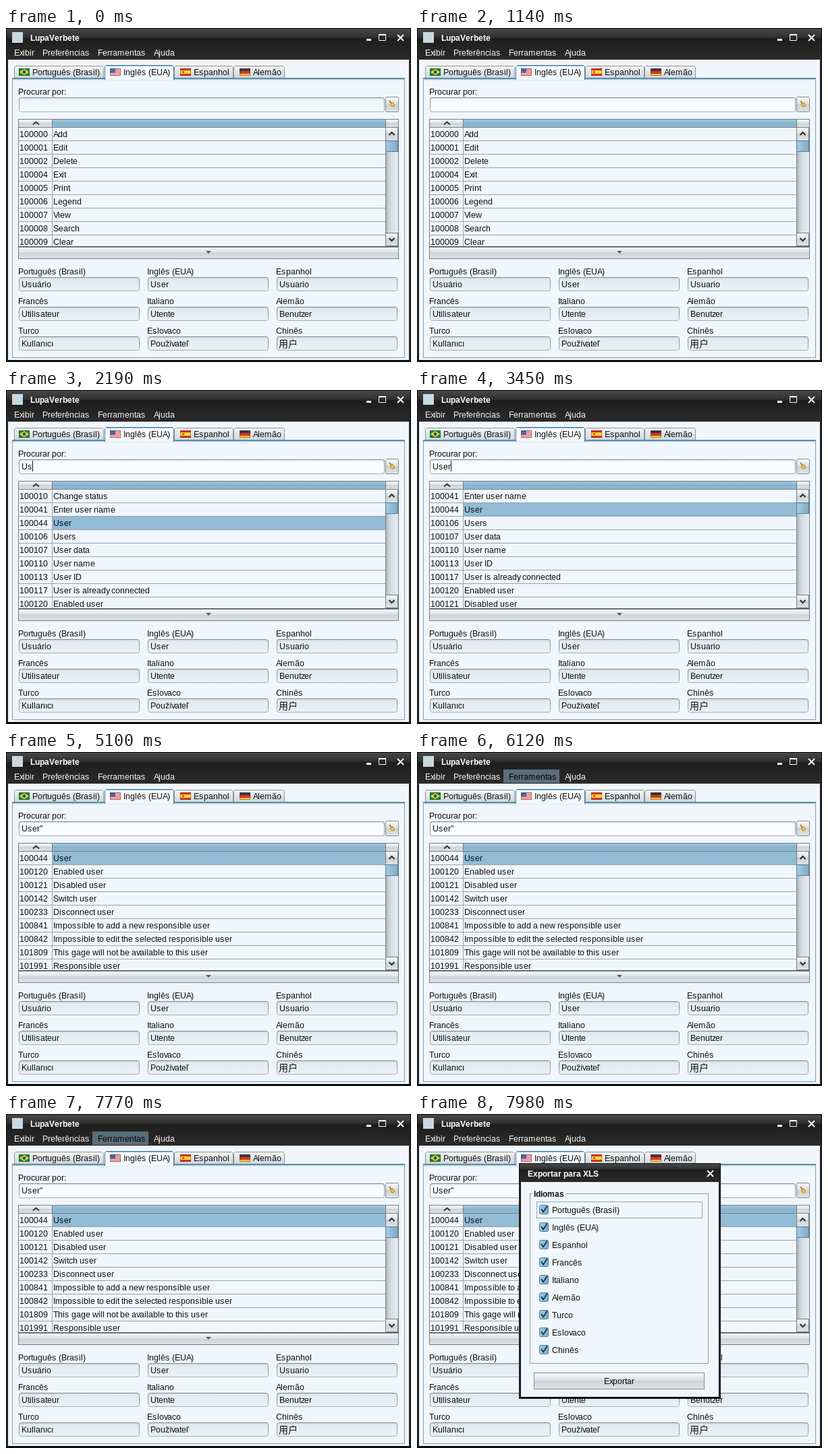
Recreate the animation shown at these times as an HTML page. Size 600 by 496 pixels, loop 8000 ms.

```html
<!DOCTYPE html>
<html lang="pt">
<head>
<meta charset="utf-8">
<title>LupaVerbete</title>
<style>
  html, body { margin: 0; width: 100%; height: 100%; overflow: hidden; background: #0b0b0b; }
  svg { display: block; width: 600px; height: 496px; }
  text { font: 12.4px "Liberation Sans", Arial, sans-serif; white-space: pre; }
  .bold { font-weight: bold; font-size: 12px; }
  .cjk { font: 14px "Noto Sans CJK SC", "Noto Sans CJK", sans-serif; }
</style>
</head>
<body>
<svg id="stage" viewBox="0 0 600 496" xmlns="http://www.w3.org/2000/svg"></svg>
<script>
const LOOP = 8000;
const INK = '#101010', PANEL = '#f0f6fb', LINE = '#9aa3a9', EDGE = '#6f7c86';
const HOVER = '#5a6d79';

// Text with whole-pixel advances, as a hinted 12px face sets it.
const pen = document.createElement('canvas').getContext('2d');
const hintFix = { s: 1, m: 1, v: -1, x: -1, y: -1, z: -1, A: -1, V: -1 };

function advance(ch, bold) {
  pen.font = (bold ? 'bold ' : '') + '12px "Liberation Sans", Arial, sans-serif';
  return Math.round(pen.measureText(ch).width) + (bold ? 0 : hintFix[ch] || 0);
}

function width(str, bold) {
  return [...str].reduce((sum, ch) => sum + advance(ch, bold), 0);
}

function text(x, y, str, fill = INK, bold = false) {
  let at = x;
  const xs = [...str].map(ch => {
    const left = at;
    at += advance(ch, bold);
    return left;
  });
  return `<text x="${xs.join(' ')}" y="${y}" fill="${fill}"${bold ? ' class="bold"' : ''}>${str}</text>`;
}

const rect = (x, y, w, h, fill, extra = '') =>
  `<rect x="${x}" y="${y}" width="${w}" height="${h}" fill="${fill}" ${extra}/>`;
const box = (x, y, w, h, fill, stroke, r = 0) =>
  rect(x + .5, y + .5, w - 1, h - 1, fill, `stroke="${stroke}" rx="${r}"`);
const path = (d, stroke, w = 1, fill = 'none') =>
  `<path d="${d}" stroke="${stroke}" stroke-width="${w}" fill="${fill}"/>`;
const group = (id, body, extra = '') => `<g id="${id}" ${extra}>${body}</g>`;
const gradient = (id, stops, across) =>
  `<linearGradient id="${id}" x2="${across ? 1 : 0}" y2="${across ? 0 : 1}">` +
  stops.map(([at, color]) => `<stop offset="${at}" stop-color="${color}"/>`).join('') +
  '</linearGradient>';

const defs = '<defs>' +
  gradient('title', [[0, '#484848'], [.28, '#303030'], [.32, '#1e1e1e'], [1, '#2b2b2b']]) +
  gradient('grey', [[0, '#f7f8f9'], [.45, '#dde1e4'], [.5, '#cdd2d6'], [1, '#dfe3e6']]) +
  gradient('blue', [[0, '#a5c8de'], [.5, '#86b2ce'], [1, '#92bbd5']]) +
  gradient('track', [[0, '#aeb9c2'], [.35, '#d3dbe1'], [1, '#e6edf2']], true) +
  gradient('thumb', [[0, '#a9cbe0'], [1, '#7eaac7']], true) +
  gradient('field', [[0, '#d2dae1'], [.2, '#e3eaf0'], [1, '#e9f0f6']]) +
  gradient('entry', [[0, '#dde4ea'], [.2, '#eef4f9'], [1, '#f2f8fd']]) +
  gradient('live', [[0, '#e4edf4'], [.2, '#f7fbff'], [1, '#fafdff']]) +
  gradient('rim', [[0, '#7c858c'], [1, '#a3adb5']]) +
  gradient('tab', [[0, '#f4f5f6'], [.5, '#e2e5e7'], [1, '#d2d7db']]) +
  gradient('tabOn', [[0, '#ffffff'], [1, PANEL]]) +
  '<clipPath id="rows"><rect x="19" y="148" width="543" height="176"/></clipPath></defs>';

function cross(x, y, r) {
  return path(`M${x - r} ${y - r}L${x + r} ${y + r}M${x + r} ${y - r}L${x - r} ${y + r}`, '#fff', 1.8);
}

function frame() {
  return rect(0, 0, 600, 496, '#0b0b0b') +
    rect(1, 1, 598, 46, 'url(#title)') +
    rect(1, 47, 1, 447, '#3a3a3a') + rect(598, 47, 1, 447, '#3a3a3a') +
    rect(3, 47, 594, 446, PANEL) +
    rect(9, 6, 16, 16, '#c9d8e0') +
    text(36, 19, 'LupaVerbete', '#fff', true) +
    rect(534, 16, 7, 3, '#fff') +
    path('M552.5 9.5h10v9h-10zM552 10.5h11', '#fff') + cross(584.5, 14.5, 4.5) +
    text(12, 41, 'Exibir', '#f4f4f4') + text(54, 41, 'Preferências', '#f4f4f4') +
    text(136, 41, 'Ferramentas', '#f4f4f4') + text(219, 41, 'Ajuda', '#f4f4f4');
}

const flags = {
  brazil: x => rect(x, 60, 16, 11, '#158a2b') +
    path(`M${x + 8} 61l7 4.5l-7 4.5l-7-4.5z`, 'none', 0, '#f7de2a') +
    `<circle cx="${x + 8}" cy="65.5" r="2.4" fill="#27449b"/>`,
  usa: x => rect(x, 60, 16, 11, '#fff') +
    [0, 2, 4, 6, 8, 10].map(dy => rect(x, 60 + dy, 16, 1, '#e0393c')).join('') +
    rect(x, 60, 8, 6, '#4467b8'),
  spain: x => rect(x, 60, 16, 11, '#e02b20') + rect(x, 63, 16, 5, '#ffd42e') +
    rect(x + 3, 64, 3, 3, '#b9682b'),
  germany: x => rect(x, 60, 16, 4, '#383838') + rect(x, 64, 16, 4, '#dd3328') +
    rect(x, 68, 16, 3, '#f7c82e')
};

function tab(x, w, label, icon, flag, on) {
  const top = on ? 55 : 56, h = on ? 22 : 18;
  const shape = `M${x + .5} ${top + h}V${top + 2.5}l2 -2H${x + w - 2.5}l2 2V${top + h}`;
  return path(shape, on ? '#3f7ba3' : '#8b959c', 1, on ? 'url(#tabOn)' : 'url(#tab)') +
    (on ? rect(x + 3, 56, w - 6, 1, '#8fbbd6') : '') +
    flags[flag](icon) + box(icon, 60, 16, 11, 'none', 'rgba(60,60,60,.45)') +
    text(icon + 20, 70, label);
}

function tabs() {
  return box(9, 75, 582, 415, PANEL, '#7c9db3') + rect(9, 74, 582, 1, '#3f7ba3') +
    rect(10, 76, 580, 1, '#b5d2e4') + rect(10, 77, 580, 1, '#dcebf5') +
    tab(12, 133, 'Português (Brasil)', 19, 'brazil') +
    tab(249, 88, 'Espanhol', 258, 'spain') +
    tab(337, 76, 'Alemão', 346, 'germany') +
    tab(146, 103, 'Inglês (EUA)', 154, 'usa', true);
}

function search() {
  return text(18, 99, 'Procurar por:') +
    box(19, 103, 542, 22, 'url(#entry)', 'url(#rim)', 3) +
    group('focus', box(19, 103, 542, 22, 'url(#live)', 'url(#rim)', 3)) +
    box(562, 102, 20, 23, 'url(#grey)', '#7f8a92', 2) +
    path('M568 108l3 4', '#96652a', 1.5) +
    path('M569 113l4-2.500l3 5l-4 2z', '#b98d1d', 1, '#ecc03a') +
    group('typed', '') + rect(23, 105, 1, 16, INK, 'id="caret"');
}

function table() {
  return rect(18, 135, 564, 208, EDGE) +
    rect(19, 136, 49, 11, 'url(#grey)') + rect(69, 136, 493, 11, 'url(#blue)') +
    rect(563, 136, 18, 11, 'url(#grey)') +
    path('M40 143.500l4.500 -4l4.500 4', '#333', 2) +
    rect(19, 148, 543, 176, PANEL) + group('list', '', 'clip-path="url(#rows)"') +
    rect(563, 148, 18, 176, 'url(#track)') +
    box(562, 147, 19, 21, 'url(#grey)', EDGE) + path('M567.5 159l4-4l4 4', '#2b2b2b', 2) +
    box(562, 167, 19, 17, 'url(#thumb)', '#4f7c9b') +
    box(562, 304, 19, 20, 'url(#grey)', EDGE) + path('M567.5 312l4 4l4-4', '#2b2b2b', 2) +
    rect(18, 324, 564, 1, '#5d666d') + rect(19, 326, 562, 16, 'url(#grey)') +
    path('M296 331h8l-4 4z', 'none', 0, '#5a5a5a');
}

function translations() {
  const items = [
    ['Português (Brasil)', 'Usuário'], ['Inglês (EUA)', 'User'], ['Espanhol', 'Usuario'],
    ['Francês', 'Utilisateur'], ['Italiano', 'Utente'], ['Alemão', 'Benutzer'],
    ['Turco', 'Kullanıcı'], ['Eslovaco', 'Používateľ'], ['Chinês', '用户']
  ];
  return items.map(([label, word], i) => {
    const x = 18 + 191 * (i % 3), y = 366 + 44 * Math.floor(i / 3);
    const value = label === 'Chinês'
      ? `<text class="cjk" x="${x + 4}" y="${y + 20}" fill="${INK}">${word}</text>`
      : text(x + 5, y + 19, word);
    return text(x, y, label) + box(x + 1, y + 4, 179, 21, 'url(#field)', 'url(#rim)', 3) + value;
  }).join('');
}

function menu() {
  const item = 'Exportar para XLS';
  return group('menuOn', rect(128, 26, 83, 20, HOVER) + text(136, 41, 'Ferramentas', '#050505')) +
    group('popup', box(128, 47, 122, 25, '#2a2a2a', '#0d0d0d') + text(137, 64, item, '#f4f4f4') +
      group('itemOn', rect(130, 49, 118, 21, HOVER) + text(137, 64, item, '#050505')));
}

function dialog() {
  const names = ['Português (Brasil)', 'Inglês (EUA)', 'Espanhol', 'Francês', 'Italiano',
    'Alemão', 'Turco', 'Eslovaco', 'Chinês'];
  const checks = names.map((name, i) => {
    const y = 135 + 26 * i;
    return box(181, y, 14, 14, 'url(#thumb)', '#4d7d9e', 2) +
      path(`M184 ${y + 6}l3 4.500l6 -9`, '#1d3c54', 2) + text(200, y + 12, name);
  }).join('');
  const label = 'Exportar';
  const content = box(168, 119, 265, 253, 'none', '#fff') + box(167, 118, 265, 253, 'none', '#8d979e') +
    rect(171, 114, 50, 10, PANEL) + text(173, 123, 'Idiomas', INK, true) + checks +
    rect(177.5, 130.5, 245, 24, 'none', 'stroke="#285b82" stroke-dasharray="1 1"') +
    box(173, 384, 253, 25, 'url(#grey)', '#7f8a92') +
    text(300 - Math.round(width(label) / 2), 401, label);
  return group('dialog', rect(151, 73, 299, 350, '#0b0b0b') + rect(152, 74, 297, 27, 'url(#title)') +
    rect(152, 101, 1, 320, '#3a3a3a') + rect(448, 101, 1, 320, '#3a3a3a') +
    rect(154, 101, 293, 319, PANEL) + text(164, 93, 'Exportar para XLS', '#fff', true) +
    cross(434.5, 88.5, 4.5) + group('content', content));
}

const users = ['100041 Enter user name', '100044 User', '100106 Users', '100107 User data',
  '100110 User name', '100113 User ID', '100117 User is already connected',
  '100120 Enabled user', '100121 Disabled user'];
const status = '100010 Change status';

const steps = [
  { at: 0, query: '', rows: ['100000 Add', '100001 Edit', '100002 Delete', '100004 Exit', '100005 Print',
    '100006 Legend', '100007 View', '100008 Search', '100009 Clear'] },
  { at: 1830, query: 'U', rows: [status,
    '100020 View could not be performed in the database. Contact the system administrator if proble...',
    '100025 Required field', '100033 Language', '100035 Portuguese (Brazil)', '100037 Portuguese (Portugal)',
    '100040 Value from [Password confirmation] field does not match with value from [Current passw...',
    ...users.slice(0, 2)] },
  { at: 2190, query: 'Us', rows: [status, ...users.slice(0, 8)] },
  { at: 2370, query: 'Use', rows: users },
  { at: 2550, query: 'User', rows: users },
  { at: 3780, query: 'User"', rows: [users[1], users[7], users[8], '100142 Switch user',
    '100233 Disconnect user', '100841 Impossible to add a new responsible user',
    '100842 Impossible to edit the selected responsible user',
    '101809 This gage will not be available to this user', '101991 Responsible user'] }
];

function drawRows(rows) {
  return rows.map((row, i) => {
    const y = 148 + 20 * i, label = row.slice(7);
    return (label === 'User' ? rect(69, y, 493, 19, '#92bbd6') : '') +
      rect(19, y + 19, 543, 1, LINE) +
      text(20, y + 14, row.slice(0, 6)) + text(70, y + 14, label);
  }).join('') + rect(68, 148, 1, 176, LINE);
}

const stage = document.getElementById('stage');
stage.innerHTML = defs + frame() + tabs() + search() + table() + translations() + menu() + dialog();

const el = {};
for (const node of stage.querySelectorAll('[id]')) el[node.id] = node;
el.list.innerHTML = steps.map(s => `<g>${drawRows(s.rows)}</g>`).join('');
el.typed.innerHTML = steps.map(s => `<g>${text(23, 118, s.query)}</g>`).join('');
const caretX = steps.map(s => 23 + width(s.query));

// Caret: [time, visible]
const blinks = [[0, 0], [720, 1], [1140, 0], [1590, 1], [3000, 0], [3450, 1], [4230, 0],
  [4650, 1], [5100, 0], [5550, 1], [5970, 0]];

const show = (node, on) => node.setAttribute('display', on ? 'inline' : 'none');
const fade = (node, level) => node.setAttribute('opacity', level);
const lastIndex = (list, test) => list.reduce((found, item, i) => test(item) ? i : found, 0);

// Linear ramp that moves in 30 ms ticks.
function ramp(t, from, count) {
  return Math.min(1, Math.max(0, (Math.floor((t - from) / 30) + 1) / count));
}

function render(t) {
  const now = lastIndex(steps, s => s.at <= t);
  for (let i = 0; i < steps.length; i++) {
    show(el.list.children[i], i === now);
    show(el.typed.children[i], i === now);
  }
  el.caret.setAttribute('x', caretX[now]);
  show(el.caret, blinks[lastIndex(blinks, b => b[0] <= t)][1]);
  fade(el.focus, t < 600 ? 0 : t < 720 ? .5 : 1);
  fade(el.menuOn, ramp(t, 6000, 4) * (1 - ramp(t, 7800, 4)));
  show(el.popup, t >= 6150 && t < 7770);
  fade(el.itemOn, ramp(t, 6690, 4));
  show(el.dialog, t >= 7890);
  show(el.content, t >= 7950);
}

const start = performance.now();
function tick() {
  render((performance.now() - start) % LOOP);
  requestAnimationFrame(tick);
}
tick();
</script>
</body>
</html>
```
